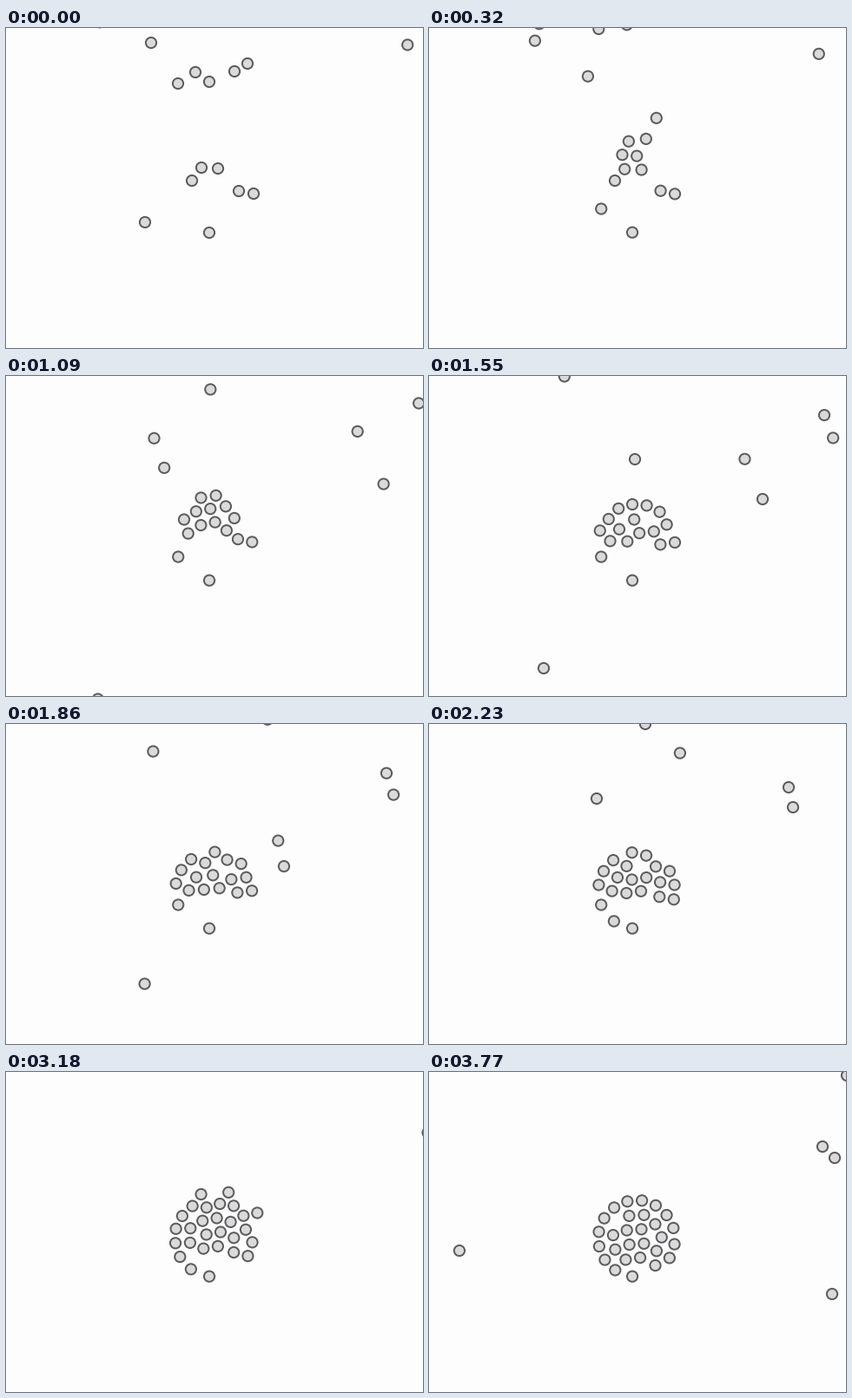
Recreate the animation shown at these times as a matplotlib script. Size 480x369 px, loop 3810 ms.

```python
import numpy as np
import matplotlib.pyplot as plt
from matplotlib.animation import FuncAnimation
from matplotlib.patches import Circle

W, H, DPI = 480, 369, 96
FRAMES, LOOP_MS = 84, 3810
CENTRE = np.array([239, 192])
RIM = 44        # the pull ends at this distance from the centre
SPACING = 16.8  # closest distance between two balls
SUBSTEPS, RELAX = 4, 6
RADIUS, STROKE = 6.1, 2

# One point (frame, x, y) on the path of each ball.
key_points = [
    (0, 234, 236), (0, 285, 191), (0, 268, 188), (0, 214, 176), (0, 225, 161),
    (0, 244, 162), (0, 160, 224), (0, 278, 41), (0, 263, 50), (0, 234, 62),
    (0, 218, 51), (0, 198, 64), (0, 167, 17),
    (14, 140, 42), (14, 141, 20), (14, 204, 39), (14, 230, 35), (14, 433, 42),
    (34, 384, 142), (34, 237, 96), (34, 132, 337),
    (49, 193, 86), (49, 289, 33), (49, 249, 0), (49, 414, 73), (49, 419, 96),
    (60, 194, 41), (60, 281, 45),
    (83, 453, 86), (83, 467, 99), (83, 464, 256), (83, 35, 206), (83, 481, 4),
]

# Speed towards the centre grows as the distance shrinks.
radii = np.linspace(400, 0, 2001)
speeds = np.minimum(1560 / np.maximum(radii, 1) - 3.27, 16)
ages = np.cumsum((radii[0] - radii[1]) / speeds)


def fall(r, dt):
    """Distance from the centre dt frames after being at distance r."""
    age = np.interp(r, radii[::-1], ages[::-1])
    return np.interp(age + dt, ages, radii)


def scale_to(pos, new_r, r):
    return CENTRE + (pos - CENTRE) * (new_r / r)[:, None]


def distance(pos):
    return np.hypot(*(pos - CENTRE).T)


def pull(pos, dt):
    r = distance(pos)
    return scale_to(pos, np.where(r > RIM, np.maximum(fall(r, dt), RIM), r), r)


def separate(pos):
    """Push overlapping balls apart, sharing the shift equally."""
    gap = pos[:, None] - pos[None]
    dist = np.hypot(gap[..., 0], gap[..., 1])
    np.fill_diagonal(dist, SPACING)
    push = np.maximum(SPACING - dist, 0) / np.maximum(dist, 0.1)
    return pos + 0.35 * (push[..., None] * gap).sum(axis=1)


def simulate():
    keys = np.array(key_points, float)
    pos = keys[:, 1:]
    r = distance(pos)
    pos = scale_to(pos, np.where(keys[:, 0] > 0, fall(r, -keys[:, 0]), r), r)
    poses = [pos]
    for _ in range(FRAMES - 1):
        for _ in range(SUBSTEPS):
            pos = pull(pos, 1 / SUBSTEPS)
            for _ in range(RELAX):
                pos = separate(pos)
        poses.append(pos)
    return poses


poses = simulate()

fig = plt.figure(figsize=(W / DPI, H / DPI), dpi=DPI, facecolor="#fefdfe")
ax = fig.add_axes([0, 0, 1, 1])
ax.set_xlim(0, W)
ax.set_ylim(H, 0)
ax.axis("off")

discs = [ax.add_patch(Circle(p, RADIUS, facecolor="#dadada", edgecolor="#5d5b5e",
                             linewidth=STROKE * 72 / DPI))
         for p in poses[0]]


def draw(frame):
    for disc, p in zip(discs, poses[frame]):
        disc.set_center(p)
    return discs


anim = FuncAnimation(fig, draw, frames=FRAMES, interval=LOOP_MS / FRAMES,
                     repeat=True, repeat_delay=0, blit=False)
plt.show()
```
